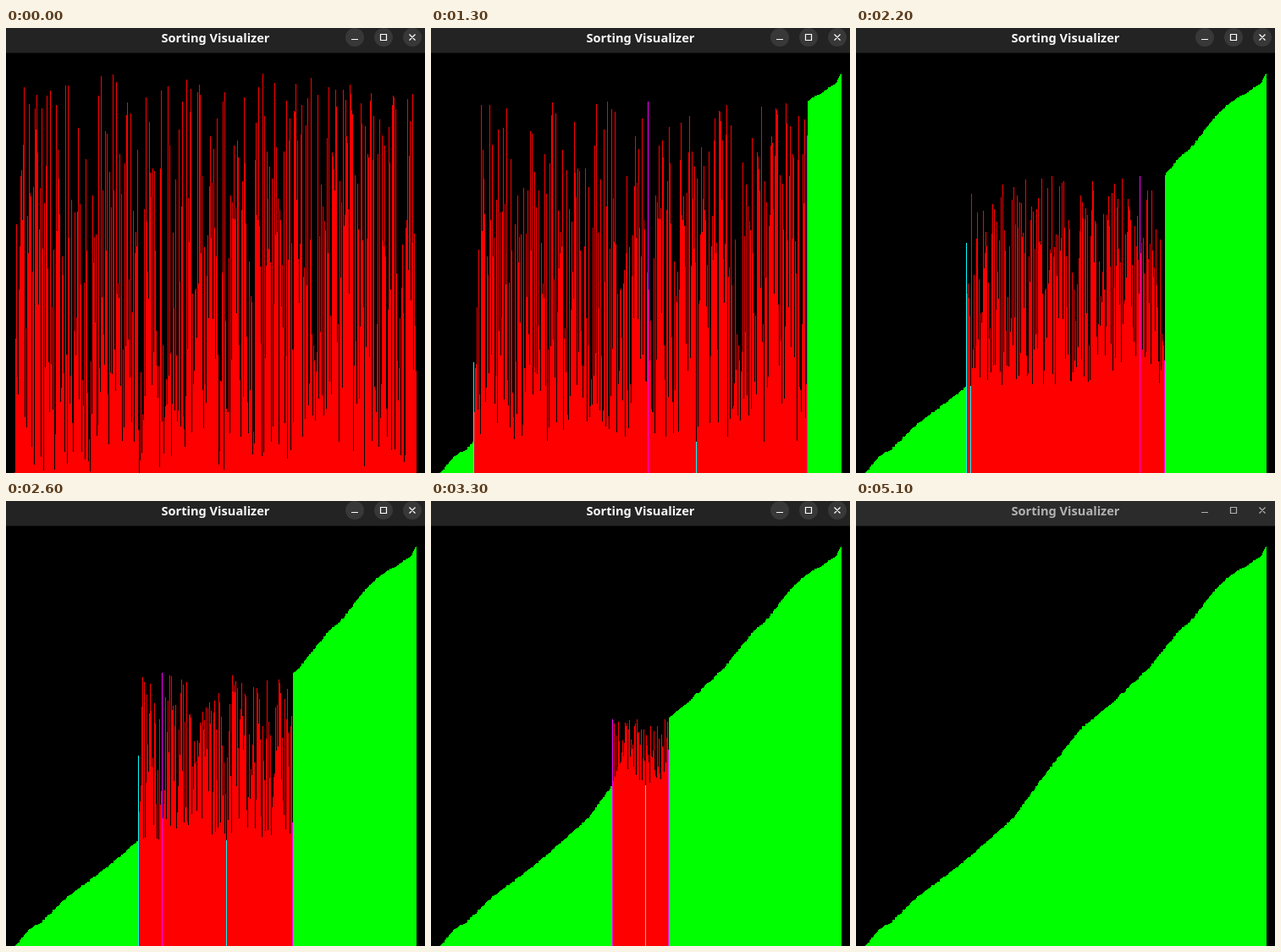
Recreate the animation shown at these times as an HTML page with a canvas. Size 495x526 px, loop 5.2 s.

```html
<!DOCTYPE html>
<html lang="en">
<head>
<meta charset="utf-8">
<title>Sorting Visualizer</title>
<style>
html, body { margin: 0; width: 100%; height: 100%; overflow: hidden; background: #000; }
canvas, svg { position: absolute; left: 0; top: 0; display: block; }
svg { --bar: #232323; --disc: #383838; --icon: #fff; --title: #f7f7f7; }
svg.blurred { --bar: #2b2b2b; --disc: transparent; --icon: #b0b0b0; --title: #b2b2b2; }
rect { fill: var(--bar); }
circle { fill: var(--disc); }
path { fill: none; stroke: var(--icon); stroke-width: 1.2; }
text { fill: var(--title); font: bold 14.6px "Noto Sans", "Open Sans", sans-serif; text-anchor: middle; }
</style>
</head>
<body>
<canvas width="495" height="526"></canvas>
<svg width="495" height="30">
  <rect width="495" height="29.5"/>
  <text x="247.5" y="17">Sorting Visualizer</text>
  <circle cx="412" cy="11" r="11"/>
  <circle cx="446" cy="11" r="11"/>
  <circle cx="480" cy="11" r="11"/>
  <path d="M408 13.5h8M442.5 7.5h7v7h-7zM476.5 7.5l7 7m0-7l-7 7"/>
</svg>
<script>
const N = 475, HALF = 237, LEFT = 10, BOTTOM = 526, LOOP = 5200;
const ctx = document.querySelector('canvas').getContext('2d');
const header = document.querySelector('svg');

// Top edge of the sorted bars, as x, y points
const EDGE = [[10, 527], [27, 506], [40, 499], [70, 470], [130, 424], [187, 373], [225, 320],
  [265, 269], [305, 236], [345, 198], [382, 152], [398, 139], [415, 115], [437, 92],
  [478, 65], [484, 53]];

// Time in ms, bars settled at each end; sorting pauses for one step midway
const PROGRESS = [[900, 5], [2400, 138], [2500, 138], [3700, HALF]];

function interpolate(points, x) {
  const i = Math.max(1, points.findIndex(p => p[0] >= x));
  const [x0, y0] = points[i - 1], [x1, y1] = points[i];
  return y0 + (y1 - y0) * (x - x0) / (x1 - x0);
}

let seed = 11;
function random() {
  seed = (seed * 1664525 + 1013904223) >>> 0;
  return seed / 4294967296;
}

function swap(list, i, j) {
  [list[i], list[j]] = [list[j], list[i]];
}

function shuffle(list) {
  for (let i = list.length - 1; i > 0; i--) swap(list, i, Math.floor(random() * (i + 1)));
  return list;
}

// Slightly uneven heights give the sorted edge its small stairs
const tops = Array.from({ length: N }, (_, i) =>
  Math.round(interpolate(EDGE, LEFT + i) + random() * 3 - 1.5)).sort((a, b) => b - a);

const start = shuffle(tops.map((_, rank) => rank));

// Two-ended selection sort: each pass settles the least and the greatest bar
function sortPasses(count) {
  const bars = start.slice();
  for (let lo = 0; lo < count; lo++) {
    const hi = N - 1 - lo;
    swap(bars, lo, bars.indexOf(lo));
    swap(bars, hi, bars.indexOf(hi));
  }
  return bars;
}

function settledAt(t) {
  if (t < 900) return 0;
  return t < 3700 ? Math.floor(interpolate(PROGRESS, t)) : HALF;
}

function draw(count) {
  const lo = count, hi = N - 1 - count;
  const sorting = count > 0 && count < HALF;
  ctx.fillStyle = '#000';
  ctx.fillRect(0, 0, 495, BOTTOM);
  sortPasses(count).forEach((rank, i) => {
    let color = '#f00';
    if (count === HALF || i < lo || i > hi) color = '#0f0';
    else if (sorting && (rank === hi || i === hi)) color = '#f0f';
    else if (sorting && (rank === lo || i === lo)) color = '#0ff';
    ctx.fillStyle = color;
    ctx.fillRect(LEFT + i, tops[rank], 1, BOTTOM - tops[rank]);
  });
}

const began = performance.now();
let shown = -1;
function tick() {
  const t = Math.floor((performance.now() - began) % LOOP / 100) * 100;
  const count = settledAt(t);
  if (count !== shown) draw(shown = count);
  header.classList.toggle('blurred', t >= 5100);
  requestAnimationFrame(tick);
}
tick();
</script>
</body>
</html>
```
